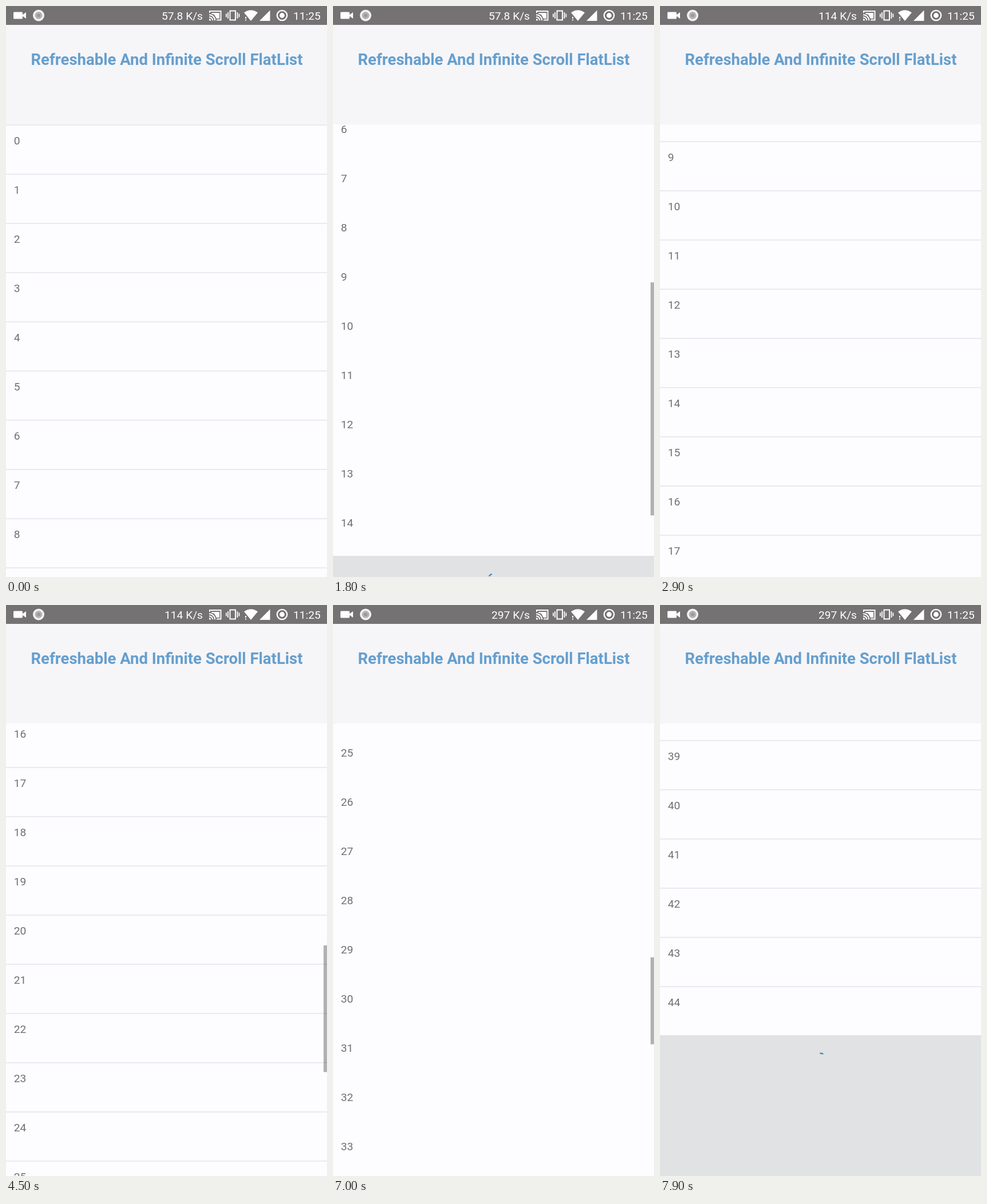
These frames come from a looping animation (561x998 px, 8000 ms). An HTML page with a canvas:

```html
<!DOCTYPE html>
<html lang="en">
<head>
<meta charset="utf-8">
<title>Infinite list</title>
<style>
html, body { margin: 0; width: 100%; height: 100%; overflow: hidden; background: #fdfcfe; }
canvas { display: block; width: 561px; height: 998px; }
</style>
</head>
<body>
<canvas id="stage" width="561" height="998"></canvas>
<script>
const ctx = document.getElementById('stage').getContext('2d');
const W = 561, H = 998, LOOP = 8000, STEP = 100;
const LIST_TOP = 207, VIEW = H - LIST_TOP, ROW = 86, FOOTER = 246, PAGE = 15;
const TAU = Math.PI * 2;

// Scroll offset over time: [ms, px]
const SCROLL = [
  [0, 0], [800, 0], [1300, 225], [1800, 536], [2050, 690], [2350, 745],
  [3600, 745], [3800, 930], [4100, 1270], [4300, 1370], [4500, 1386],
  [4600, 1398], [5200, 1960], [5600, 2022], [5800, 2035],
  [6900, 2035], [7000, 2127], [7200, 2700], [7400, 3325], [8000, 3325]
];
const GESTURES = [[800, 2350], [3600, 5800], [6900, 7400]];
const LOADS = [2800, 6100];

const clamp = (v, lo = 0, hi = 1) => Math.min(hi, Math.max(lo, v));
const slope = i => (SCROLL[i + 1][1] - SCROLL[i][1]) / (SCROLL[i + 1][0] - SCROLL[i][0]);

function tangent(i) {
  if (i === 0 || i === SCROLL.length - 1) return 0;
  const a = slope(i - 1), b = slope(i);
  return a * b > 0 ? 2 * a * b / (a + b) : 0;
}

// Monotone cubic interpolation, so the list never overshoots
function scrollAt(t) {
  let i = 0;
  while (i < SCROLL.length - 2 && t >= SCROLL[i + 1][0]) i++;
  const [t0, y0] = SCROLL[i], [t1, y1] = SCROLL[i + 1];
  const d = t1 - t0, u = clamp((t - t0) / d), v = 1 - u;
  return y0 * (1 + 2 * u) * v * v + tangent(i) * d * u * v * v
       + y1 * u * u * (3 - 2 * u) - tangent(i + 1) * d * u * u * v;
}

function barAlpha(t) {
  const g = GESTURES.find(([from, to]) => t > from && t < to + 500);
  return g ? 1 - clamp((t - g[1] - 300) / 200) : 0;
}

function rect(x, y, w, h, color) {
  ctx.fillStyle = color;
  ctx.fillRect(x, y, w, h);
}

function disc(x, y, r, color) {
  ctx.fillStyle = color;
  ctx.beginPath();
  ctx.arc(x, y, r, 0, TAU);
  ctx.fill();
}

function arc(x, y, r, from, to, width, color) {
  ctx.strokeStyle = color;
  ctx.lineWidth = width;
  ctx.beginPath();
  ctx.arc(x, y, r, from, to);
  ctx.stroke();
}

function poly(points, color) {
  ctx.fillStyle = color;
  ctx.beginPath();
  points.forEach(([x, y]) => ctx.lineTo(x, y));
  ctx.fill();
}

function text(str, x, y, size, color, weight = 400, align = 'left') {
  ctx.font = `${weight} ${size}px Roboto, sans-serif`;
  ctx.textAlign = align;
  ctx.fillStyle = color;
  ctx.fillText(str, x, y);
}

function drawSpinner(t, y) {
  const mid = (35 + (t - 5600) * 0.303 - 90) * Math.PI / 180;
  arc(W / 2, y, 9.5, mid - 0.33, mid + 0.33, 2.3, '#3d8cc0');
}

function drawList(t) {
  const scroll = scrollAt(t);
  const count = PAGE * (1 + LOADS.filter(at => t >= at).length);
  const moved = Math.abs(scroll - scrollAt(Math.max(0, t - STEP)));
  const lineAlpha = 1 - clamp((moved - 12) / 30);
  const first = Math.floor(scroll / ROW);

  rect(0, LIST_TOP, W, VIEW, '#fdfcfe');
  for (let i = first; i < count; i++) {
    const y = LIST_TOP + i * ROW - scroll;
    if (y > H) break;
    ctx.globalAlpha = lineAlpha;
    rect(0, y, W, 2, '#e9ebee');
    ctx.globalAlpha = 1;
    text(i, 13.65, y + 35, 19.2, '#707072');
  }

  const end = LIST_TOP + count * ROW - scroll;
  if (end < H) {
    rect(0, end, W, H - end, '#e1e2e3');
    drawSpinner(t, end + 41);
  }

  const ratio = VIEW / (count * ROW + FOOTER);
  rect(W - 6, LIST_TOP + scroll * ratio, 6, VIEW * ratio, `rgba(0,0,0,${0.3 * barAlpha(t)})`);
}

function drawHeader() {
  rect(0, 33, W, LIST_TOP - 33, '#f6f5f8');
  text('Refreshable And Infinite Scroll FlatList', 281, 102.5, 27.5, '#659fce', 700, 'center');
}

function drawStatusBar(t) {
  const bar = '#757274', ink = '#ffffff';
  rect(0, 0, W, 33, bar);

  // Camera and recorder
  ctx.fillStyle = ink;
  ctx.beginPath();
  ctx.roundRect(13, 10.5, 16, 12, 1.5);
  ctx.fill();
  poly([[28, 16], [35, 11], [35, 22], [28, 17]], ink);
  disc(57, 16.5, 10, '#f4f3f4');
  disc(57, 16.5, 6.5, '#b5b4b5');
  disc(57, 16.5, 3, '#9a999a');

  const speed = t < 2300 ? '57.8 K/s' : t < 5300 ? '114 K/s' : '297 K/s';
  text(speed, 344, 24, 19.2, ink, 400, 'right');

  // Cast
  ctx.strokeStyle = ink;
  ctx.lineWidth = 2;
  ctx.beginPath();
  [[356, 12], [356, 9], [375.5, 9], [375.5, 24.5], [368, 24.5]].forEach(p => ctx.lineTo(...p));
  ctx.stroke();
  poly([[359, 12], [373, 12], [373, 22], [368, 22], [364, 15], [359, 13.5]], ink);
  ctx.save();
  ctx.beginPath();
  ctx.rect(355, 13, 14, 12.5);
  ctx.clip();
  disc(355, 25.5, 3.2, ink);
  arc(355, 25.5, 6.3, -Math.PI / 2, 0, 2, ink);
  arc(355, 25.5, 10.2, -Math.PI / 2, 0, 2, ink);
  ctx.restore();

  // Vibrate
  ctx.lineWidth = 2;
  ctx.strokeRect(391.5, 8.5, 9.5, 16);
  [[387, 11], [384, 13.5], [403.5, 11], [406.5, 13.5]].forEach(([x, y]) =>
    rect(x, y, 1.8, 2 * (16.5 - y), ink));

  // Wi-Fi and signal
  ctx.fillStyle = ink;
  ctx.beginPath();
  ctx.moveTo(428, 26);
  ctx.lineTo(416, 11.5);
  ctx.quadraticCurveTo(428, 3, 440, 11.5);
  ctx.fill();
  rect(415, 17, 6, 9, bar);
  rect(418, 19, 2, 3, ink);
  rect(418, 23.5, 2, 2, ink);
  poly([[443, 26], [461.5, 26], [461.5, 7.5]], ink);

  // Target
  arc(482.5, 16.5, 8.7, 0, TAU, 2.3, ink);
  disc(482.5, 16.5, 4.4, ink);

  text('11:25', 502, 24, 19.2, ink);
}

function frame(now) {
  const t = Math.floor((now % LOOP) / STEP) * STEP;
  drawList(t);
  drawHeader();
  drawStatusBar(t);
  requestAnimationFrame(frame);
}
requestAnimationFrame(frame);
</script>
</body>
</html>
```
